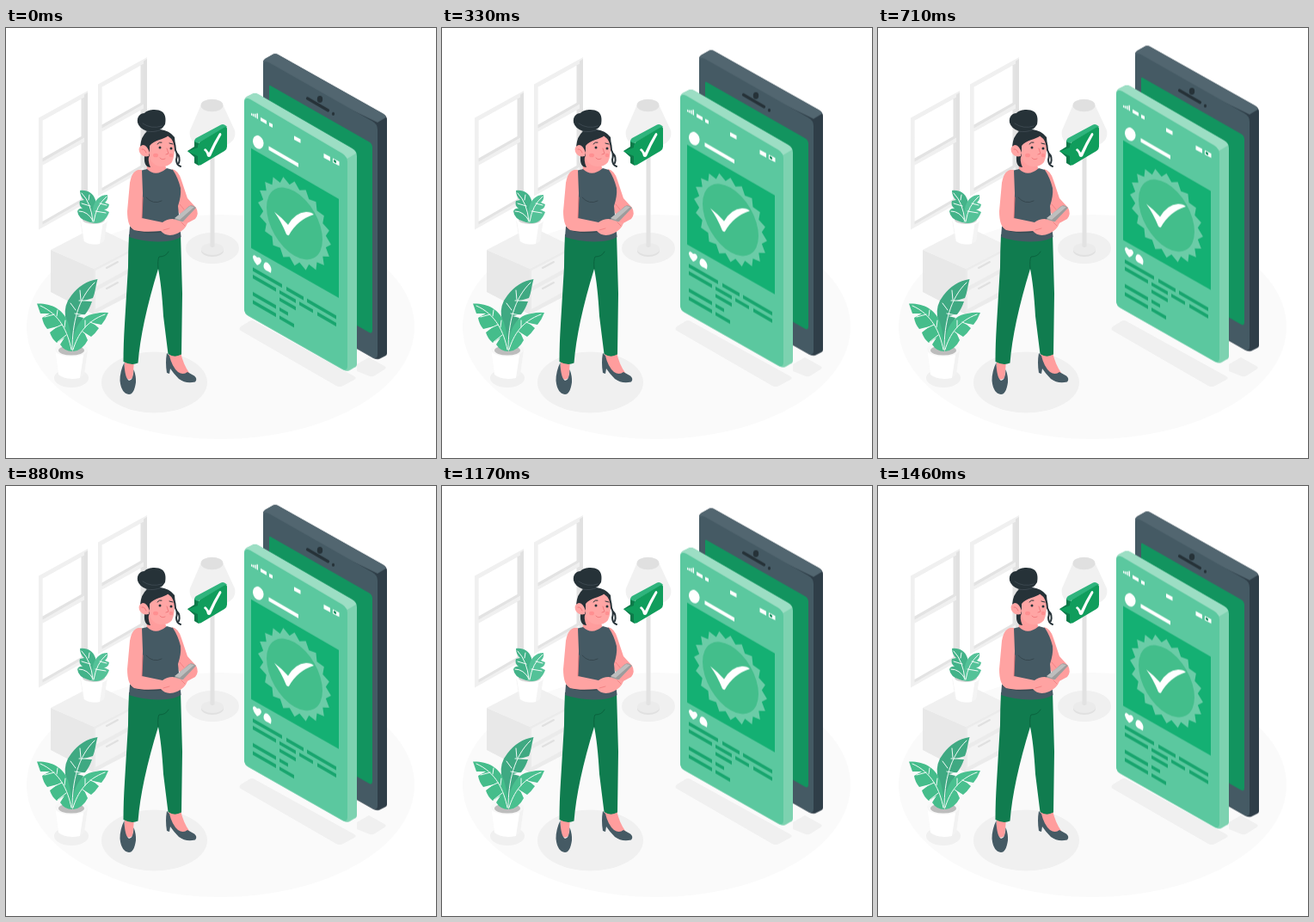
Animation, 500 px wide and 500 px high, one loop 1500 ms. Source, as an HTML page:

```html
<!DOCTYPE html>
<html lang="en">
<head>
<meta charset="utf-8">
<title>Verified post</title>
<style>
html, body { margin: 0; width: 100%; height: 100%; overflow: hidden; background: #fff; }
svg { display: block; width: 100vw; height: 100vh; }
.line { fill: none; stroke-linecap: round; stroke-linejoin: round; }
.vein { fill: none; stroke: #f3fbf8; stroke-width: 1; stroke-linecap: round; }
</style>
</head>
<body>
<svg viewBox="0 0 500 500">
  <defs>
    <g id="window">
      <path fill="#f0f0f0" d="M0 31L57 -.5V129L0 161Z"/>
      <path fill="#e1e1e1" d="M53 4L57 1.500V129L53 131Z"/>
      <path fill="#e3e3e3" d="M4.500 34L53 7V54L4.500 82ZM4.500 86L53 59V127L4.500 155Z"/>
      <path fill="#fff" d="M4.500 34L49.500 9V52.500L4.500 78ZM4.500 86L49.500 61V125.500L4.500 151.500Z"/>
    </g>
  </defs>

  <ellipse cx="249.500" cy="347.500" rx="225.500" ry="130.500" fill="#fafafa"/>
  <ellipse cx="172.500" cy="412" rx="61.500" ry="35.500" fill="#f0f0f0"/>
  <ellipse cx="240" cy="256" rx="31" ry="18" fill="#f0f0f0"/>
  <ellipse cx="76" cy="407" rx="20" ry="11" fill="#f0f0f0"/>
  <path fill="#f0f0f0" d="M273 347L283 341Q286 339 289 341L405 405Q408 407 405 409L392 416Q388 418 384 416L273 352Q270 350 273 347ZM408 391L422 383L440 393Q443 395 440 397L429 404Q426 406 423 405L408 399Z"/>

  <use href="#window" x="107" y="34.500"/>
  <use href="#window" x="38" y="73.500"/>

  <g id="cabinet">
    <path fill="#f0f0f0" d="M52 258L104 231L152 254L102 280Z"/>
    <path fill="#e8e8e8" d="M52 258L102 280V333L52 307Z"/>
    <path fill="#ebebeb" d="M102 280L152 254V307L102 333Z"/>
    <path fill="#f3f3f3" d="M104 282L150 258V276L104 301ZM104 306L150 281V302L104 327Z"/>
    <path class="line" stroke="#e0e0e0" stroke-width="2" d="M117 279L130 272M117 303L130 296"/>
  </g>

  <g id="lamp">
    <ellipse cx="240" cy="259" rx="13" ry="7" fill="#e0e0e0"/>
    <ellipse cx="240" cy="257" rx="13" ry="7" fill="#ebebeb"/>
    <path fill="#e2e2e2" d="M237.500 130H242.500V254Q240 256 237.500 254Z"/>
    <path fill="#f1f1f1" d="M226.500 90L214 119C211 132 224 139 240 139S269 132 266 119L252.500 90Z"/>
    <ellipse cx="239.500" cy="90" rx="13" ry="7.300" fill="#e0e0e0"/>
  </g>

  <g id="bubble">
    <path fill="#0c7a49" d="M219 131L224 133V160L219 157V150L211 143L219 138Z"/>
    <path fill="#2fb47d" d="M219 132Q219 129 222 127.500L250 112.500Q252 111.500 254 112.500L257 114.500L223 134Z"/>
    <path fill="#109d5c" d="M226 132L254 115.500Q257 114 257 117V138Q257 141 254 143L227 159Q223 161 223 157V149L211 143.500L223 139V137Q223 134 226 132Z"/>
    <path fill="#fff" d="M230 142Q231 139 233 141L236 145Q242 132 248 122.500Q250 121 250.500 124Q243 137 238 149Q236 151 234 149Q233 144 230 142Z"/>
  </g>

  <g id="smallPlant">
    <path fill="#f4f4f4" d="M86 223H118L114 248Q102 256 90 248Z"/>
    <path fill="#fff" d="M87 224H113L109 251Q98 253 91 248Z"/>
    <ellipse cx="102" cy="223" rx="16" ry="7" fill="#fff"/>
    <ellipse cx="102" cy="223" rx="13" ry="5" fill="#d5d5d5"/>
    <path fill="#43b389" d="M86 189C94 188 101 191 104 200L106 224Q102 228 95 225Q84 222 83 213Q85 209 89 210Q84 206 86 201L91 200Q86 196 86 189Z"/>
    <path fill="#54c298" d="M118 194C109 194 103 200 101 210L99 226C108 229 116 225 120 214L114 211Q119 211 120 205L115 203Q119 200 118 194Z"/>
    <path class="vein" d="M88 192Q99 203 101 225M117 196Q105 206 102 225M85 213Q95 213 101 224M96 200L97 194M98 207L88 204M109 204L117 206M104 213L116 215"/>
  </g>

  <g id="bigPlant">
    <path fill="#f2f2f2" d="M57 374H95L91 403Q76 414 61 403Z"/>
    <path fill="#fff" d="M57 374H91L86 407Q70 410 61 403Z"/>
    <ellipse cx="76" cy="374" rx="19" ry="8" fill="#f7f7f7"/>
    <ellipse cx="76" cy="375" rx="15" ry="5.500" fill="#bdbdbd"/>
    <path fill="#3fa982" d="M106.500 292C104 301 104 307 101 314L91 317L100 318Q97 327 92 333L82 335L90 337Q82 350 79 374L75 372Q74 350 69 336Q67 322 76 311Q88 295 106.500 292Z"/>
    <path fill="#45bd8b" d="M36 320.500C52 320 66 326 72 342Q77 358 77 376Q68 376 63 368L68 360L59 366Q53 361 51 354L60 347L48 350Q43 344 42 337L51 332L40 332Z"/>
    <path fill="#49c08f" d="M119 331Q116 339 111 345L101 343L108 349Q104 355 99 359L91 354L95 363Q89 375 78 376C76 358 83 334 104 332Q112 330 119 331Z"/>
    <path class="vein" d="M103 296C84 314 77 343 77 374M40 323C63 333 72 354 76 374M115 333C93 341 83 357 78 374M85 317L99 317M80 332L91 334M81 328L75 320M87 316L86 305M56 333L45 336M65 345L52 351M70 357L60 365M59 335L60 328M68 348L69 340M98 342L109 347M89 353L97 359M92 348L92 340"/>
  </g>

  <g id="woman">
    <g id="feet">
      <path fill="#ff9d9d" d="M138 386H149L147.500 406Q143 412 138 405ZM189 378L203 377Q206 391 213 401L201 403L190 391Z"/>
      <path fill="#455a64" d="M137.500 389Q132.500 399 132.500 410Q134 425 143 426Q149 426 151 412Q151.500 405 148.500 397Q148 410 143 410Q138 407 137.500 389ZM187 378Q185 389 187 401L190 402L191 396Q195 402 201 408Q209 414 220 411.500Q223 408 219 404.500L211 400Q206 404 200 400Q193 394 190 381Z"/>
    </g>
    <path fill="#107c4f" d="M143 240Q142 259 142 278L138 344Q136.500 368 136.500 388Q146 393 153.500 389.500Q157 345 177 280Q181 300 183 335L188.500 379Q196 384 204 379.500L205 309L203 239Z"/>
    <path class="line" stroke="#0a633e" d="M177 280Q176 270 178 266Q186 266 189 260"/>

    <path fill="#ff9d9d" d="M166 146L184 156L187 166Q177 176 163 168ZM193 164Q201 166 204 177L211 198L221 209Q225 216 220 222L207 229L200 212L197 198Z"/>
    <path fill="#455a64" d="M156 166L164 164Q174 174 187 163L194 165Q200 174 203 186Q204 195 200 207L203.500 243Q197 247 187 248Q163 250 143 243L144 231L158 222Z"/>
    <path class="line" stroke="#36474f" d="M163 197Q171 206 181 201M145 233Q162 241 187 236"/>
    <path fill="#9c9c9c" d="M195 223L213 207Q217 205 221 209L205 226Q199 229 195 223Z"/>
    <path fill="#bebebe" d="M196 221L214 207L219 208L202 223Z"/>
    <path fill="#ffa3a2" d="M158 165Q147 163 144 180L141 213Q141 231 149 235Q160 238 180 236Q187 244 199 239Q208 235 211 227L204 225L194 222Q187 222 182 226L158 221L159 192Z"/>
    <path class="line" stroke="#ef7c7e" stroke-width=".8" d="M158 221L159 197M183 235L190 233M204 226L208 230M202 205L207 211"/>

    <g id="head">
      <path fill="#263238" d="M153 110C152 103 156 99 161 99C165 94 177 94 181 97C186 100 186 107 185 112Q183 116 179 118Q190 119 196 127L197 138L180 150L167 148Q164 153 168 162Q160 162 161 149L156 138Q157 126 164 120Q155 117 153 110Z"/>
      <path class="line" stroke="#465159" stroke-width=".7" d="M159 111Q169 118 181 114M163 120Q172 122 181 118"/>
      <path fill="#ffa5a4" d="M167 137C172 130 183 130 189 125Q194 127 195.500 134Q197 147 193 156Q189 161 182 161Q173 162 167 152Z"/>
      <path fill="#ffa5a4" d="M167 145Q164 136 159 136Q153 138 155 144Q158 151 166 149Z"/>
      <path class="line" stroke="#ee777a" stroke-width=".9" d="M158 141Q161 140 163 145M187 140L189 146L186 147M179 151Q181 154 185 152"/>
      <ellipse cx="174" cy="148" rx="3" ry="2.300" fill="#ff8f91"/>
      <ellipse cx="192" cy="148" rx="2.300" ry="2.200" fill="#ff8f91"/>
      <g fill="#263238"><circle cx="179" cy="139" r="1.500"/><circle cx="192" cy="140" r="1.500"/></g>
      <path class="line" stroke="#263238" d="M176 135Q178 132 181 133M190 134L194 135"/>
      <path class="line" stroke="#263238" stroke-width="2" d="M189 125Q197 130 197 142Q200 147 198 153Q198 159 203 161M199 146Q203 150 201 157"/>
    </g>
  </g>

  <g id="phones">
    <path fill="#2f3e48" d="M299 40Q299 37 303 35L311 30.500Q314 29.500 317 31.500L438 99.500Q443 102 443 107V379Q443 381 440 382L434 385Q431 386 427 384L299 311Z"/>
    <path fill="#526670" d="M299 40Q299 37 303 35L311 30.500Q314 29.500 317 31.500L438 99.500Q442 102 442 104L432 110L299 45Z"/>
    <path fill="#455a64" d="M299 45Q299 36 307 41L426 108.500Q432 112 432 118V380Q432 386 426 383L299 311Z"/>
    <path fill="#12945f" d="M306 68Q306 66 309 68L423 133Q426 135 426 138V352Q426 356 422 354L306 288Z"/>
    <path class="line" stroke="#263238" stroke-width="3.200" d="M350.500 82L374.500 96"/>
    <g fill="#263238"><ellipse cx="365" cy="83" rx="3.200" ry="4"/><ellipse cx="380.500" cy="100" rx="1.600" ry="1.900"/></g>

    <path fill="#7dd2b0" d="M277 85Q277 82 280 80L286 77Q289 75 293 77L402 140Q408 143 408 149V391Q408 394 405 395L400 398Q397 400 393 398L282 335Q277 332 277 327Z"/>
    <path fill="#9cdec4" d="M277 85Q277 82 280 80L286 77Q289 75 293 77L402 140Q406 142 407 146L397 152L277 90Z"/>
    <path fill="#5bc89f" d="M277 87Q277 80 284 83L391 146Q397 150 397 156V393Q397 400 391 397L282 335Q277 332 277 327Z"/>
    <path fill="#14b073" d="M285 140L387 199V314L285 256Z"/>

    <g transform="matrix(.866 .5 0 1 335.500 227.500)">
      <polygon id="seal" fill="#6bcca7"/>
      <circle r="37.500" fill="#43be8b"/>
    </g>
    <path fill="#fff" d="M312 214Q320 220 328 229Q336 215 349 214Q355 214 358 217Q339 223 329 241Q328 242 326 240Q320 225 312 214Z"/>

    <g fill="#fff">
      <ellipse cx="293.300" cy="133" rx="6" ry="8" transform="rotate(-20 293 133)"/>
      <path d="M305.500 137.500L340 157.500V162L305.500 142ZM296 104L303 108V112L296 108ZM306 110L310 112V116L306 114ZM335 125.500L342.500 129.500V134L335 130ZM369.500 146L377 150V155L369.500 151ZM380 151.500L387.500 155.500V160.500L380 156.500ZM285 99L286.500 100V102.500L285 101.500ZM287.300 99.500L288.700 100.300V103.500L287.300 102.700ZM289.500 99.500L290.800 100.300V104.700L289.500 104ZM291.600 99L293 99.800V106L291.600 105.200Z"/>
      <path d="M292 276Q287 270 287 266Q288 262 292 267Q296 266 297 271Q296 275 292 276ZM299.500 277Q300 271 304 273Q308 276 308.500 281L308 285L304.500 283Q299.500 281 299.500 277Z"/>
    </g>
    <path fill="#178f60" d="M381 153L384 154.700V157.500L381 155.800Z"/>
    <path id="text" fill="#18a56e"/>
  </g>
</svg>
<script>
const $ = id => document.getElementById(id);

const TEETH = 20;
$("seal").setAttribute("points", Array.from({ length: TEETH * 2 }, (_, i) => {
  const a = i * Math.PI / TEETH, r = i % 2 ? 42.5 : 49;
  return `${(r * Math.cos(a)).toFixed(2)},${(r * Math.sin(a)).toFixed(2)}`;
}).join(" "));

// Text bars: row offset at the left margin, start x, end x.
const SLOPE = 0.577, LEFT = 287, BAR = 4.2;
const bars = [
  [278.5, 287, 321], [278.5, 326, 346], [278.5, 350, 384],
  [287, 287, 314], [287, 318, 337], [287, 341, 357], [287, 362, 384],
  [295.5, 318, 337],
  [307, 287, 314], [307, 318, 328],
  [316.5, 287, 314], [316.5, 318, 335]
];
$("text").setAttribute("d", bars.map(([row, a, b]) => {
  const y = x => row + (x - LEFT) * SLOPE;
  return `M${a} ${y(a)}L${b} ${y(b)}v${BAR}L${a} ${y(a) + BAR}Z`;
}).join(""));

$("phones").animate(
  [0, -10, 0].map(y => ({ transform: `translateY(${y}px)` })),
  { duration: 1500, iterations: Infinity, easing: "linear" }
);
</script>
</body>
</html>
```
